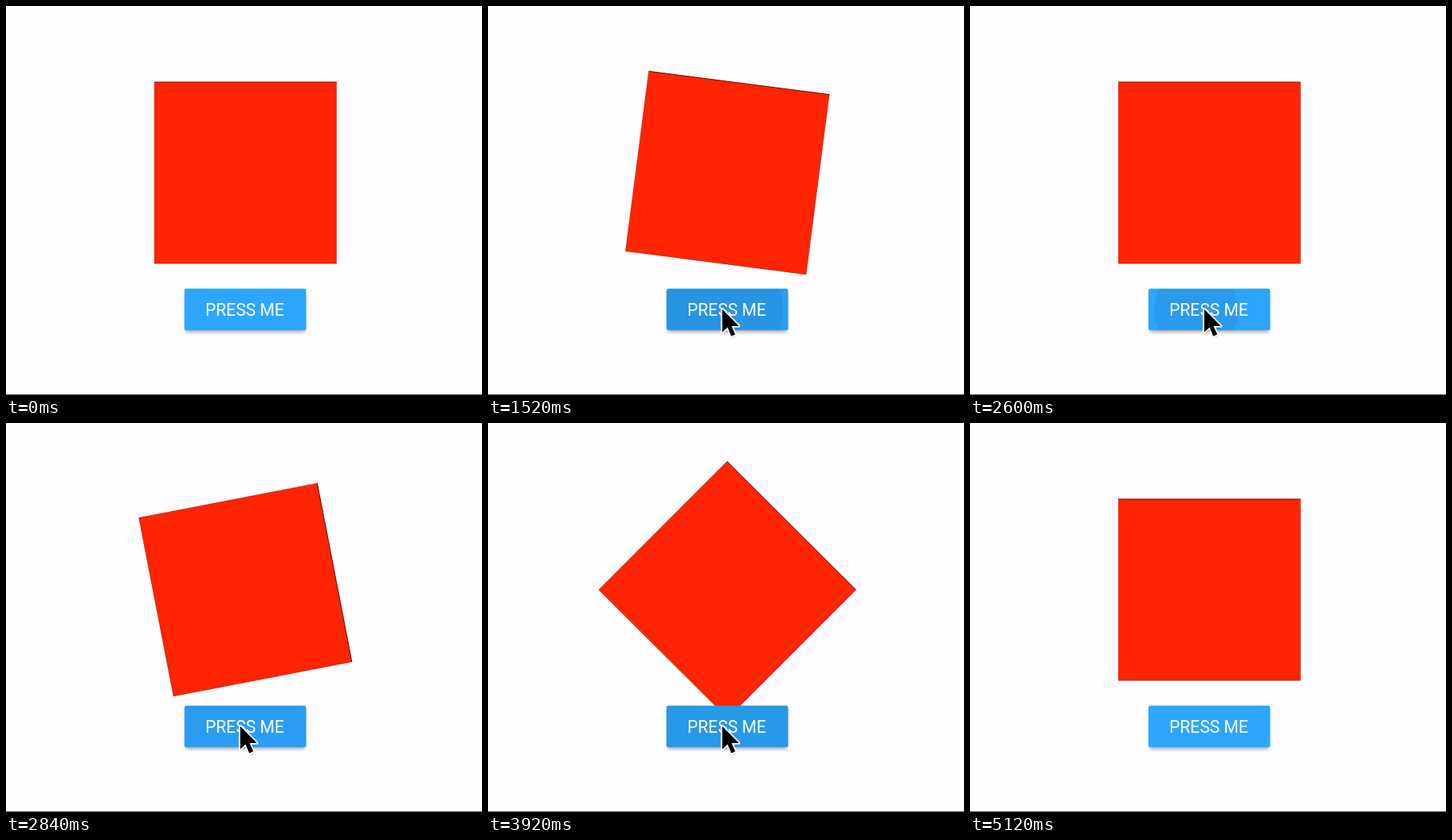
An HTML page that plays this animation: 600 by 491 pixels, repeating every 5.36 s.

```html
<!DOCTYPE html>
<html lang="en">
<head>
<meta charset="utf-8">
<title>Press to spin</title>
<style>
  html, body { margin: 0; width: 100%; height: 100%; overflow: hidden; background: #fffdff; }
  svg { display: block; width: 600px; height: 491px; }
  text { font: 21.2px Roboto, Arial, sans-serif; fill: #fff; }
</style>
</head>
<body>
<svg viewBox="0 0 600 491">
  <defs>
    <clipPath id="face"><rect x="225" y="356.7" width="153.3" height="52.6" rx="2.5"/></clipPath>
    <filter id="blur" x="-20%" y="-40%" width="140%" height="180%"><feGaussianBlur stdDeviation="2"/></filter>
    <filter id="soft" x="-50%" y="-50%" width="200%" height="200%"><feGaussianBlur stdDeviation="1.2"/></filter>
  </defs>
  <rect width="600" height="491" fill="#fffdff"/>
  <g id="square">
    <rect x="187" y="95.8" width="229.6" height="229.4" fill="#ff2502"/>
    <path d="M187 96.1H416.6" stroke="#4a0b00" stroke-width=".8"/>
    <path d="M187.1 96V325H416.5V96" fill="none" stroke="#7a1400" stroke-width=".35"/>
  </g>
  <rect x="226" y="360" width="151.3" height="52" rx="3" fill="#000" opacity=".3" filter="url(#blur)"/>
  <g clip-path="url(#face)">
    <rect x="225" y="356" width="154" height="54" fill="#2ca6ff"/>
    <rect id="shade" x="225" y="356" width="154" height="54"/>
    <circle id="ripple"/>
  </g>
  <text x="251.2" y="391.2">PRESS ME</text>
  <path d="M0 490.5H600" stroke="#666468"/>
  <g id="cursor">
    <path d="M0 0V29L6.7 22.8L11.3 34L16.4 31.8L11.8 21.2H21Z" transform="translate(.5 2)" opacity=".35" filter="url(#soft)"/>
    <path d="M0 0V29L6.7 22.8L11.3 34L16.4 31.8L11.8 21.2H21Z" stroke="#fff" stroke-width="3.6" stroke-linejoin="round" paint-order="stroke"/>
  </g>
</svg>
<script>
const LOOP = 5360, STEP = 40, SPIN = 400;
const presses = [
  { down: 1393, up: 1476 },
  { down: 2576, up: 2678 },
  { down: 3705, up: 3802.5 }
];
const moves = [
  { from: 0, to: 200, a: [452, 496], b: [464, 428] },
  { from: 460, to: 1000, a: [464, 428], b: [295.3, 382.8] },
  { from: 4280, to: 4800, a: [295.3, 382.8], b: [463, 23] }
];

const el = id => document.getElementById(id);
const square = el("square"), shade = el("shade"), ripple = el("ripple"), cursor = el("cursor");
const clamp = x => Math.min(1, Math.max(0, x));
const mix = (a, b, k) => a + (b - a) * k;
const smooth = x => x * x * (3 - 2 * x);

// cubic-bezier(.42, 0, 1, 1)
function easeIn(x) {
  if (x <= 0 || x >= 1) return clamp(x);
  let lo = 0, hi = 1;
  for (let i = 0; i < 24; i++) {
    const p = (lo + hi) / 2, q = 1 - p;
    if (1.26 * q * q * p + 3 * q * p * p + p ** 3 < x) lo = p; else hi = p;
  }
  return smooth(lo);
}

function drawPress(t) {
  const press = presses.findLast(p => t >= p.down);
  const age = press ? t - press.down : LOOP;
  const since = press ? t - press.up : LOOP;
  const grow = 1 - (1 - clamp(age / 225)) ** 2;
  ripple.setAttribute("cx", mix(281, 301.5, grow));
  ripple.setAttribute("cy", mix(384, 383, grow));
  ripple.setAttribute("r", mix(46, 81, grow));
  ripple.setAttribute("opacity", 0.065 * clamp(age / 24) * (1 - clamp((age - 225) / 150)));
  shade.setAttribute("opacity", 0.055 * clamp((age - 15) / 65) * (1 - clamp(since / 180)));
  square.setAttribute("transform", `rotate(${360 * easeIn(since / SPIN)} 301.8 210.5)`);
}

function drawCursor(t) {
  const move = moves.findLast(m => t >= m.from);
  const k = smooth(clamp((t - move.from) / (move.to - move.from)));
  const [x, y] = move.a.map((a, i) => mix(a, move.b[i], k));
  cursor.setAttribute("transform", `translate(${x} ${y})`);
  cursor.setAttribute("visibility", t >= 40 && t < 4800 ? "visible" : "hidden");
}

function draw(time) {
  const t = Math.floor((time % LOOP) / STEP) * STEP;
  drawPress(t);
  drawCursor(t);
}

const start = performance.now();
function tick() {
  draw(performance.now() - start);
  requestAnimationFrame(tick);
}
tick();
</script>
</body>
</html>
```
